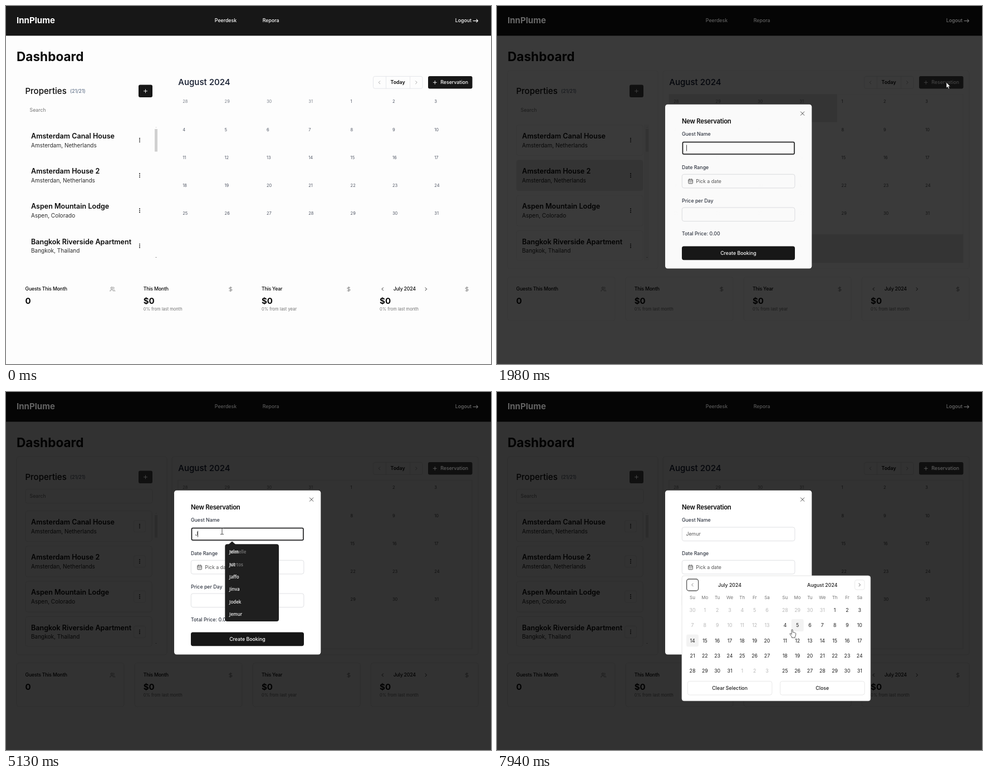
These frames come from a looping animation (871x643 px, 8 s). An HTML page:

```html
<!DOCTYPE html>
<html lang="en">
<head>
<meta charset="utf-8">
<title>Reservation dashboard</title>
<style>
html, body { margin: 0; width: 100%; height: 100%; overflow: hidden; background: #fdfdfd; }
svg { display: block; width: 871px; height: 643px; font-family: Inter, sans-serif; font-optical-sizing: none; }
text { white-space: pre; }
.menu { font-family: "Open Sans", "Noto Sans", sans-serif; }
#modal, #picker { transform-box: fill-box; transform-origin: center; }
#picker { transform-origin: top; }
</style>
</head>
<body>
<script>
const LOOP = 8000;
const SCALE = .628;
const [XS, SM, MD, TITLE, LG, XL, HUGE] = [12, 14, 16, 18, 20, 24, 36].map(px => px * SCALE);

const T = (x, y, s, size, weight, fill, more = '') =>
  `<text x="${x}" y="${y}" font-size="${size}" font-weight="${weight}" fill="${fill}" ${more}>${s}</text>`;
const R = (x, y, w, h, r, fill, stroke = 'none', sw = .7, more = '') =>
  `<rect x="${x}" y="${y}" width="${w}" height="${h}" rx="${r}" fill="${fill}" stroke="${stroke}" stroke-width="${sw}" ${more}/>`;
const P = (d, stroke, sw = .9, fill = 'none') =>
  `<path d="${d}" fill="${fill}" stroke="${stroke}" stroke-width="${sw}" stroke-linecap="round" stroke-linejoin="round"/>`;
const G = (id, body, more = '') => `<g id="${id}" ${more}>${body}</g>`;
const MID = 'text-anchor="middle"';
const TIGHT = 'letter-spacing="-.025em"';

const plus = (x, y, c) => P(`M${x - 3} ${y}h6M${x} ${y - 3}v6`, c, .9);
const chevron = (x, y, dir, c) => P(`M${x - 1.2 * dir} ${y - 2.5}l${2.5 * dir} 2.5l${-2.5 * dir} 2.5`, c, .9);
const icon = (x, y, d, c) =>
  `<g transform="translate(${x - 5} ${y - 5}) scale(.418)">${P(d, c, 2)}</g>`;
const DOLLAR = 'M12 2v20M17 5H9.5a3.5 3.5 0 0 0 0 7h5a3.5 3.5 0 0 1 0 7H6';
const USERS = 'M16 21v-2a4 4 0 0 0-4-4H6a4 4 0 0 0-4 4v2M22 21v-2a4 4 0 0 0-3-3.87M16 3.13a4 4 0 0 1 0 7.75M5 7a4 4 0 1 0 8 0a4 4 0 1 0-8 0';
const CALENDAR = 'M5 4h14a2 2 0 0 1 2 2v14a2 2 0 0 1-2 2H5a2 2 0 0 1-2-2V6a2 2 0 0 1 2-2zM3 10h18M8 2v4M16 2v4M8 14h0M12 14h0M16 14h0M8 18h0M12 18h0M16 18h0';

const homes = [
  ['Amsterdam Canal House', 'Amsterdam, Netherlands'],
  ['Amsterdam House 2', 'Amsterdan, Netherlands'],
  ['Aspen Mountain Lodge', 'Aspen, Colorado'],
  ['Bangkok Riverside Apartment', 'Bangkok, Thailand']
];

const light = {
  bg: '#fdfdfd', head: '#171717', logo: '#fff', nav: '#fff', logout: '#fff', ink: '#0a0a0a',
  title: '#0f172a', place: '#2b2b2b', mute: '#737373', count: '#64748b', day: '#525866', out: '#7b808a',
  btn: '#171717', btnText: '#fff', plus: '#fff', frame: '#e2e4e8', arrow: '#9b9b9b', thumb: '#d0d0d0'
};
const dark = {
  bg: '#323232', head: '#050505', logo: '#626262', nav: '#585858', logout: '#6a6a6a', ink: '#020202',
  title: '#03050a', place: '#070707', mute: '#171717', count: '#131518', day: '#111', out: '#191919',
  btn: '#101010', btnText: '#606060', plus: '#4c4c4c', frame: '#2d2d2d', arrow: '#1d1d1d', thumb: '#2b2b2b',
  line: '#2d2d2d'
};
const dimming = { ...dark, btnText: '#3c3c3c', plus: '#3c3c3c', line: '#2f2f2f', early: true };

function frames(c) {
  let s = R(19, 116, 270, 356, 4, 'none', c.line) + R(298, 116, 550, 356, 4, 'none', c.line);
  if (c.early) s += R(309, 158, 302, 50.4, 0, '#2c2c2c') + R(309, 410, 528, 51, 0, '#2c2c2c') + R(264, 213, 9, 244, 0, '#303030');
  else s += R(35, 174.5, 228, 25, 3.5, 'none', c.line);
  s += R(309, 158.5, 528, 303, 0, 'none', c.line);
  homes.forEach((h, i) => {
    const y = 213.5 + 63.3 * i;
    s += R(35, y, 227, Math.min(55, 457 - y), 4, c.early && i === 1 ? '#2b2b2b' : 'none', c.line);
    if (!c.early) s += R(229.5, y + 17, 21, 21, 3, 'none', c.line);
  });
  for (let i = 0; i < 4; i++) s += R(19 + 212.1 * i, 486.5, 193, 78.5, 4, 'none', c.line);
  return s;
}

function page(c) {
  let s = R(0, 0, 871, 643, 0, c.bg) + R(0, 0, 871, 53.4, 0, c.head);
  if (c.line) s += frames(c);
  s += T(19, 31.2, 'InnPlume', XL, 700, c.logo)
    + T(394.5, 29.2, 'Peerdesk', SM, 500, c.nav, MID) + T(475.7, 29.2, 'Repora', SM, 500, c.nav, MID)
    + T(806.8, 29.2, 'Logout', SM, 500, c.logout) + P('M839 26.6h8.5m-2.6-2.6l2.6 2.6l-2.6 2.6', c.logout, 1.1)
    + T(19, 98.7, 'Dashboard', HUGE, 700, c.ink);

  s += T(34.4, 157.8, 'Properties', XL, 500, c.ink) + T(115, 156, '(21/21)', SM, 500, c.count)
    + R(238, 141.5, 25, 22.5, 3, c.btn) + plus(250.5, 152.8, c.plus) + T(42.5, 190, 'Search', SM, 400, c.mute);
  homes.forEach(([name, place], i) => {
    const y = 237.7 + 63.3 * i;
    s += T(45, y, name, LG, 600, c.ink) + T(45, y + 15.8, place, MD, 400, c.place);
    for (const d of [0, 3.1, 6.2]) s += `<circle cx="240" cy="${y + d}" r=".95" fill="${c.ink}"/>`;
  });
  s += R(267, 221, 5, 40.5, 0, c.thumb) + R(268.7, 217.5, 1.6, 1, 0, c.thumb) + R(268.7, 451, 1.6, 1, 0, c.mute);

  s += T(309.3, 142.4, 'August 2024', XL, 500, c.title)
    + R(659.5, 126.4, 88.5, 21.8, 3, 'none', c.frame, .9) + P('M682.5 126.5v21.6M725.5 126.5v21.6', c.frame, .8)
    + chevron(670.5, 137.3, -1, c.arrow) + chevron(736.8, 137.3, 1, c.arrow)
    + T(703.6, 140.4, 'Today', SM, 600, c.ink, MID)
    + R(758, 126, 79.5, 22.4, 3, c.btn, 'none', 0, c.line ? '' : 'id="reserve"')
    + plus(770.3, 137.3, c.btnText) + T(780.2, 140.4, 'Reservation', SM, 500, c.btnText);
  for (let i = 0; i < 35; i++) {
    const n = i < 4 ? 28 + i : i - 3;
    s += T(317.2 + 75.35 * (i % 7), 174.4 + 50.25 * Math.floor(i / 7), n, XS, 400, i < 4 ? c.out : c.day);
  }

  ['Guests This Month', 'This Month', 'This Year', 'July 2024'].forEach((label, i) => {
    const x = 34.6 + 212.15 * i;
    s += T(i === 3 ? 695.7 : x, 511.4, label, SM, 500, c.ink, TIGHT)
      + T(x, 534.6, i ? '$0' : '0', XL, 700, c.ink)
      + icon(x + 156.6, 508.5, i ? DOLLAR : USERS, c.mute);
    if (i) s += T(x, 547, '0% from last ' + (i === 2 ? 'year' : 'month'), XS, 400, c.mute);
  });
  return s + chevron(676.3, 508.4, -1, c.ink) + chevron(754.3, 508.4, 1, c.ink);
}

function modal() {
  const label = (y, s) => T(332, y, s, SM, 500, '#303642');
  const box = y => R(332.3, y, 202.6, 24.6, 3.6, '#fff', '#dcdde0', .9);
  return R(302, 176.7, 263.3, 294.8, 4.5, '#fff')
    + P('M545.4 189.9l6.4 6.4M551.8 189.9l-6.4 6.4', '#4a4a4a', 1)
    + T(332, 211, 'New Reservation', TITLE, 600, '#0a0a0a', TIGHT)
    + label(233.4, 'Guest Name') + box(242.9)
    + R(333.5, 244.5, 200.4, 21.4, 2, '#fff', '#0d0d0d', 1.5, 'id="nameRing"')
    + T(339.4, 258.2, '', SM, 400, '#555', 'id="guest"') + R(340, 249.5, .8, 11, 0, '#111', 'none', 0, 'id="caret"')
    + label(293, 'Date Range') + R(330.8, 300.6, 205.8, 28.2, 5, '#fff', '#0a0a0a', 1.5, 'id="dateRing"')
    + box(302.3) + icon(347.6, 314.7, CALENDAR, '#3f3f3f') + T(357.3, 317.9, 'Pick a date', SM, 400, '#555')
    + label(352.7, 'Price per Day') + box(362)
    + label(412.1, 'Total Price: 0.00')
    + R(332, 431.5, 203, 24.7, 3.6, '#171717') + T(433.4, 447, 'Create Booking', SM, 500, '#fff', MID);
}

function menu(id, names, w, h) {
  return G(id, R(393.3, 273.2, w, h, 4, '#1f1f1f') + P('M399.5 274L406 268.2L412.5 274z', 'none', 0, '#1f1f1f')
    + names.map((n, i) => T(401, 290.2 + 22.35 * i, n, 8, 600, '#f4f4f4')).join(''), 'class="menu"');
}

function month(x, title, before, first) {
  let s = T(x + 67, 349.5, title, SM, 500, '#1c1c1c', MID);
  ['Su', 'Mo', 'Tu', 'We', 'Th', 'Fr', 'Sa'].forEach((d, i) => s += T(x + 22.33 * i, 371.7, d, 8, 400, '#737373', MID));
  for (let i = 0; i < 35; i++) {
    const n = i - before + 1, cx = x + 22.33 * (i % 7), cy = 391.8 + 27.3 * Math.floor(i / 7);
    const shown = n < 1 ? first + i : n > 31 ? n - 31 : n;
    const off = n < 1 || n > 31 || (before === 1 && n < 14);
    if (before === 1 && n === 14) s += R(cx - 11, cy - 11, 22, 22, 3.2, '#f3f3f3');
    if (before === 4 && n === 5) s += R(cx - 11, cy - 11, 22, 22, 3.2, '#f3f3f3', 'none', 0, 'id="hover"');
    s += T(cx, cy + 3.1, shown, SM, 400, off ? '#b9b9b9' : '#1f1f1f', MID);
  }
  return s;
}

function picker() {
  const wide = (x, s) => R(x, 519.5, 151.6, 24.6, 3.6, '#fff', '#e3e3e3', .8) + T(x + 75.8, 535, s, SM, 500, '#1f1f1f', MID);
  return R(332, 330, 338.7, 224.7, 4, '#fff', '#dedede', .8)
    + R(340.6, 336, 21, 21, 4, '#fff', '#595959', 1.3) + chevron(351, 346.4, -1, '#777')
    + R(642.6, 337.7, 17.4, 17.4, 3.4, '#fff', '#e5e5e5', .8) + chevron(651.2, 346.4, 1, '#555')
    + month(351, 'July 2024', 1, 30) + month(517.3, 'August 2024', 4, 28)
    + wide(342.3, 'Clear Selection') + wide(508.5, 'Close');
}

const pointers = {
  arrow: P('M0 0V9.6L2.2 7.6L3.8 11.2L5.4 10.5L3.9 7H6.8z', '#222', .6, '#fff'),
  beam: P('M-2.5-5.5h1.8l.7.6l.7-.6h1.8M0-4.9V4.9M-2.5 5.5h1.8l.7-.6l.7.6h1.8', '#333', .9),
  hand: P('M-1.1 1.2a1.1 1.1 0 0 1 2.2 0V5l1.9.3l1.8.4l1.3.8q.8.6.6 1.8l-.6 3.2l-.9 1.7v1.6H-.6v-1.5L-2.3 11L-4 8.2q-.2-1.4 1.2-1.1L-1.1 8.6z', '#333', .8, '#fff')
};

document.body.innerHTML = `<svg viewBox="0 0 871 643">`
  + G('light', page(light)) + G('dimming', page(dimming)) + G('dark', page(dark)) + G('modal', modal())
  + menu('menuAll', ['Mistelle', 'Mirtos'], 112, 55)
  + menu('menuJ', ['Jelm', 'Jut', 'Jaffo', 'Jinva', 'Jodek', 'Jemur'], 96.7, 138.8)
  + G('ghost', T(401, 290.2, 'Mistelle', 8, 600, '#f4f4f4') + T(401, 312.5, 'Mirtos', 8, 600, '#f4f4f4'), 'class="menu"')
  + G('picker', picker())
  + G('cursor', Object.entries(pointers).map(([k, v]) => G(k, v)).join(''))
  + `</svg>`;

const $ = id => document.getElementById(id);
const ramp = (t, a, b) => Math.min(1, Math.max(0, (t - a) / (b - a)));
const fade = (id, v) => { $(id).style.opacity = v; $(id).style.visibility = v > 0 ? 'visible' : 'hidden'; };
const show = (id, on) => fade(id, on ? 1 : 0);
const during = (t, ...spans) => spans.some(([a, b]) => t >= a && t < b);

// time, x, y, pointer shape from then on
const path = [
  [580, 835, 606, 'arrow'], [700, 778, 430, 'arrow'], [820, 724, 300, 'arrow'], [940, 702, 212, 'arrow'],
  [1070, 729, 158, 'arrow'], [1380, 807, 137.5, 'arrow'], [2170, 807, 137.5, 'arrow'], [2400, 690, 178, 'arrow'],
  [2700, 470, 252, 'beam'], [2990, 375, 288, 'beam'], [3060, 375, 302, 'beam'], [3230, 375, 302, 'beam'],
  [3460, 374, 253.5, 'beam'], [3660, 374, 250, 'beam'], [3830, 374, 250, 'beam'], [4060, 388, 250, 'beam'],
  [6100, 388, 250, 'beam'], [6140, 535, 303.5, 'hand'], [6210, 535, 303.5, 'hand'], [6480, 470, 318, 'hand'],
  [6680, 468, 320, 'arrow'], [6940, 468, 336, 'arrow'], [7640, 541, 410, 'hand'], [7740, 549, 417, 'hand'],
  [7930, 530, 426.5, 'hand']
];

function moveCursor(t) {
  show('cursor', t >= 580);
  let i = path.length - 1;
  while (i > 0 && path[i][0] > t) i--;
  const a = path[i], b = path[i + 1] || a;
  const k = a === b ? 0 : ramp(t, a[0], b[0]);
  const x = a[1] + (b[1] - a[1]) * k, y = a[2] + (b[2] - a[2]) * k;
  $('cursor').setAttribute('transform', `translate(${x} ${y})`);
  for (const kind in pointers) $(kind).style.display = kind === a[3] ? '' : 'none';
}

function render(t) {
  const dim = ramp(t, 1890, 1985), open = ramp(t, 1885, 1980);
  $('reserve').setAttribute('fill', t >= 1790 ? '#2c2c2c' : '#171717');
  fade('dimming', t < 2050 ? dim : 0);
  show('dark', t >= 2050);
  fade('modal', open * (t < 2050 ? .975 : 1));
  $('modal').style.transform = `scale(${.95 + .05 * open})`;

  const typed = t < 4800 ? '' : t < 5260 ? 'J' : 'Jemur';
  $('guest').textContent = typed;
  $('caret').setAttribute('x', typed === '' ? 340 : typed === 'J' ? 344.2 : 368);
  show('caret', during(t, [1920, 2460], [2940, 3440], [4000, 4530], [4800, 5400]));
  show('nameRing', during(t, [1920, 5470]));
  show('dateRing', during(t, [5470, 6600]));

  fade('menuAll', t < 4800 ? ramp(t, 4080, 4200) : 0);
  show('menuJ', during(t, [5070, 5260]));
  fade('ghost', during(t, [5070, 5260]) ? .42 * (1 - ramp(t, 5140, 5200)) : 0);

  const drop = ramp(t, 6600, 6740);
  fade('picker', drop);
  $('picker').style.transform = `scale(${.95 + .05 * drop})`;
  show('hover', t >= 7640);
  moveCursor(t);
}

const start = performance.now();
function tick() {
  render((performance.now() - start) % LOOP);
  requestAnimationFrame(tick);
}
tick();
</script>
</body>
</html>
```
